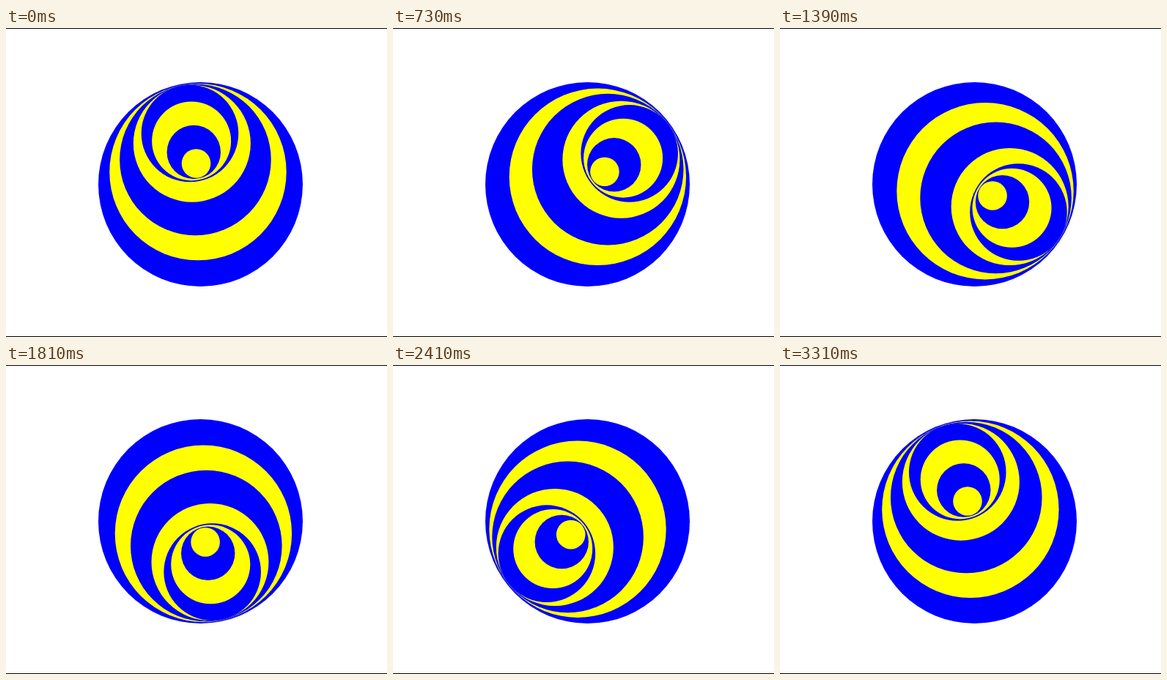
Write an HTML page with a canvas that moves like this. It is 520 px wide and 422 px high and loops after 3370 ms.

```html
<!DOCTYPE html>
<html lang="en">
<head>
<meta charset="utf-8">
<title>Nested circles</title>
<style>
  html, body { margin: 0; width: 100%; height: 100%; overflow: hidden; background: #fff; }
  canvas { display: block; }
</style>
</head>
<body>
<canvas id="stage" width="520" height="422"></canvas>
<script>
const ctx = document.getElementById('stage').getContext('2d');
const W = 520, H = 422, CX = 265.5, CY = 213.5;
const LOOP = 3370, FIRST = 130, STEP = 60;
const STEPS = 1 + (LOOP - FIRST) / STEP;

// [distance from the centre, radius], outermost first
const rings = [
  [0, 139.5], [17.2, 120.7], [34.4, 103.3], [57, 80],
  [71, 66.3], [60.4, 54], [45, 36.7], [29.1, 19.8]
];

// The turn is even, except that it drags between these steps
const START = -11.8, DRAG = 0.225;
const slow = [[0, 9], [11, 18], [23, 27], [31, 36]];

const clamp = (v, lo, hi) => Math.min(Math.max(v, lo), hi);

function progress(step) {
  return slow.reduce((p, [from, to]) => p - DRAG * (clamp(step, from, to) - from), step);
}

function bar(y, height, color) {
  ctx.fillStyle = color;
  ctx.fillRect(0, y, W, height);
}

function draw(time) {
  const step = time < FIRST ? 0 : 1 + Math.floor((time - FIRST) / STEP);
  const degrees = START + 360 * progress(step) / progress(STEPS);
  const angle = degrees * Math.PI / 180;
  const dx = Math.sin(angle), dy = -Math.cos(angle);

  bar(0, H, '#fff');
  bar(0, 1, '#000');
  bar(H - 1, 1, '#000');

  rings.forEach(([dist, radius], i) => {
    ctx.fillStyle = i % 2 ? '#ff0' : '#00f';
    ctx.beginPath();
    ctx.arc(CX + dx * dist, CY + dy * dist, radius, 0, Math.PI * 2);
    ctx.fill();
  });
}

const start = performance.now();
function tick() {
  draw((performance.now() - start) % LOOP);
  requestAnimationFrame(tick);
}
tick();
</script>
</body>
</html>
```
